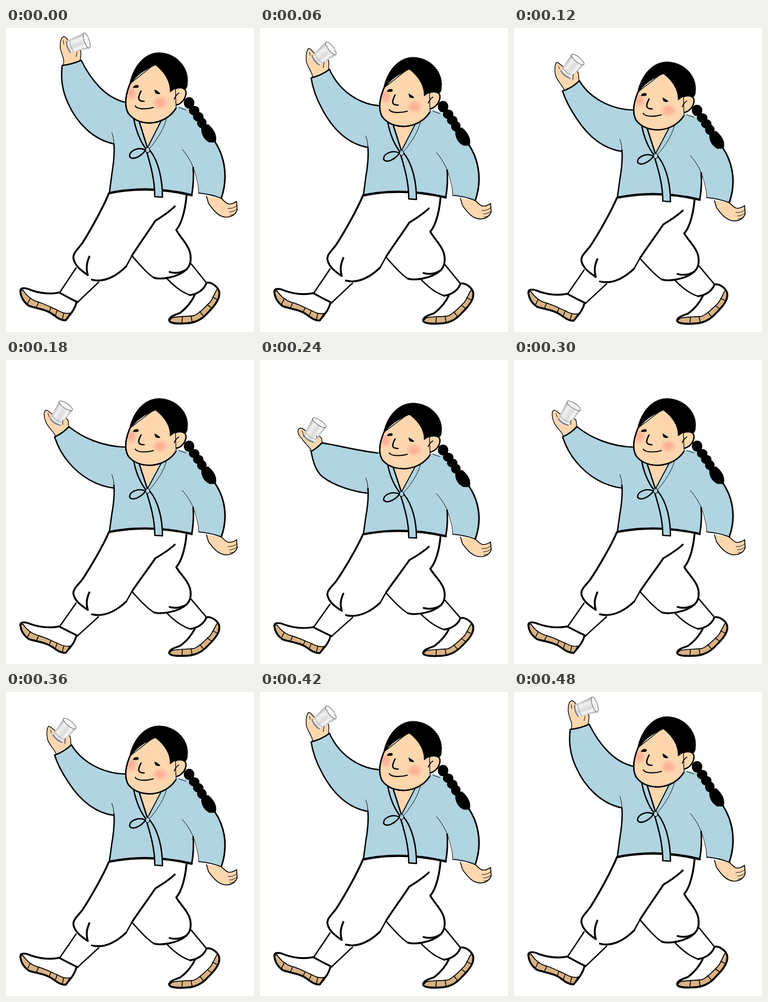
An HTML page that plays this animation: 485 px wide and 593 px high, repeating every 540 ms.

```html
<!DOCTYPE html>
<html lang="en">
<head>
<meta charset="utf-8">
<title>Raised cup</title>
<style>
html, body { margin: 0; width: 100%; height: 100%; overflow: hidden; background: #fff; }
svg { display: block; }
path, ellipse { fill: none; stroke: #000; stroke-width: 2.7; stroke-linecap: round; stroke-linejoin: round; }
.thin { stroke-width: 1; }
.bold { stroke-width: 3.7; }
.cloth { fill: #b0d4e0; }
.skin { fill: #fed7ae; }
.hair { fill: #000; }
.sole { fill: #d9b384; stroke-width: 1.8; }
.plain { stroke: none; }
</style>
</head>
<body>
<svg width="485" height="593" viewBox="0 0 485 593">
  <defs>
    <radialGradient id="blush">
      <stop offset="0" stop-color="#fdaa94"/>
      <stop offset=".5" stop-color="#fdb398" stop-opacity=".8"/>
      <stop offset="1" stop-color="#fdc6a4" stop-opacity="0"/>
    </radialGradient>
    <linearGradient id="glass" x2="0" y2="1">
      <stop offset="0" stop-color="#a8a8a8"/>
      <stop offset=".25" stop-color="#f2f2f2"/>
      <stop offset=".6" stop-color="#dcdcde"/>
      <stop offset=".82" stop-color="#fafafa"/>
      <stop offset="1" stop-color="#9a9a9a"/>
    </linearGradient>
    <path id="jaw" d="M242 110C233 133 232 153 239 166C250 181 268 186 285 185C305 183 322 173 332 157L330 100L292 70Z"/>
    <clipPath id="face"><use href="#jaw"/></clipPath>
  </defs>

  <path id="hand" class="skin" style="stroke-width:1.4"/>
  <path id="sleeve" class="cloth"/>
  <g id="cup">
    <path class="plain" style="fill:url(#glass)" d="M-20 -12L20 -16V16L-20 12Q-25 0 -20 -12Z"/>
    <path style="stroke:#858585;stroke-width:3" d="M-18 -11Q-22 0 -18 11"/>
    <path style="stroke:#b0b0b0;stroke-width:1.5" d="M-11 -12Q-15 0 -11 12"/>
    <ellipse cx="20" rx="5" ry="15.5" style="fill:#f5f5f5;stroke:#555;stroke-width:1"/>
  </g>
  <path id="fingers" class="thin"/>

  <g id="figure">
    <!-- trousers -->
    <path class="bold" d="M201 323C190 350 165 395 149 420C140 432 130 440 132 450C135 465 150 475 160 482C156 468 158 458 163 446"/>
    <path class="bold" d="M168 491C195 498 220 480 235 465"/>
    <path d="M235 465L247 443"/>
    <path class="bold" d="M247 443C265 415 280 395 292 376C305 368 318 360 330 348"/>
    <path class="bold" d="M353 327C351 350 345 380 333 394C340 408 360 425 361 445C362 460 358 465 353 471C335 488 300 491 289 487"/>
    <path d="M289 487C275 478 260 460 246 444"/>
    <path class="bold" d="M320 476Q337 481 353 471"/>
    <path d="M137 468L105 516M181 496L140 535M362 460L392 497M315 489C330 505 345 516 360 521"/>
    <path class="bold" d="M104 516Q122 526 140 535M392 497C388 510 375 519 360 521"/>

    <!-- shoes -->
    <path class="sole" d="M33 511C42 525 52 532 65 535C80 540 92 547 100 550C110 556 118 558 125 556L117 571C108 572 100 566 92 560C80 550 60 548 45 543C35 535 28 525 28 513Z"/>
    <path class="sole" d="M414 508C408 515 405 530 397 537C388 545 380 556 368 561C355 563 340 562 325 565L319 571C320 577 335 578 350 577C370 577 385 568 395 555C405 545 420 530 418 515Z"/>
    <path style="stroke-width:1.6" d="M47 528L41 540M64 535L59 546M88 545L84 555M100 551L96 562M113 556L110 569M404 525L414 530M394 540L402 546M379 553L386 562M362 562L364 574M345 563L344 576"/>
    <path class="bold" d="M104 516C85 520 65 517 48 511C40 507 28 505 28 513C29 525 35 535 45 542C60 547 80 549 92 559C100 565 108 571 117 570C124 560 135 550 138 534"/>
    <path class="bold" d="M392 497C402 495 415 505 417 515C419 530 405 545 395 555C385 567 370 576 350 576C335 577 318 576 319 569C321 562 330 560 340 556C355 545 365 530 369 521"/>

    <!-- lowered hand and jacket -->
    <path class="skin" style="stroke-width:1.7" d="M392 328L396 342C405 355 415 368 430 369C440 369 448 365 452 355L451 338C445 343 438 344 434 343C428 340 424 335 421 332"/>
    <path class="thin" d="M434 352Q444 353 452 346M437 359Q445 359 452 353M438 365Q445 365 450 360"/>
    <path class="cloth plain" d="M234 144L211 226Q213 250 207 285L202 323Q280 306 363 327L367 272C374 290 377 305 377 322Q400 324 421 332C437 285 424 245 408 221L393 190C385 172 365 158 338 153Z"/>
    <path d="M211 226Q213 250 207 285L202 323"/>
    <path class="thin" d="M207 204Q211 214 211 226M338 155L352 160M345 237C360 255 368 272 373 295Q377 308 377 322"/>
    <path style="stroke-width:1.8" d="M377 322Q400 324 421 332"/>
    <path style="stroke-width:3.1" d="M408 221C424 245 437 285 421 332M366 272Q368 300 363 327"/>
    <path style="stroke-width:4.6" d="M202 322Q280 306 363 326"/>

    <!-- collar and ribbon -->
    <path class="skin plain" d="M258 174L276 231L303 178Z"/>
    <path class="thin" d="M314 176C308 200 292 222 280 236"/>
    <path style="stroke-width:1.8" d="M303 182L277 233"/>
    <path d="M250 178C254 200 263 222 274 236M261 184L276 232"/>
    <path class="cloth" d="M275 241C282 265 291 295 291 329L306 330C306 300 300 262 281 238"/>
    <path class="cloth" d="M273 238C258 231 240 240 242 251C248 259 265 250 273 238Z"/>
    <ellipse class="cloth" cx="277" cy="238" rx="4" ry="5" style="stroke-width:1.3"/>

    <!-- braid -->
    <g transform="translate(0 -2)">
      <ellipse class="hair" cx="358" cy="148" rx="9" ry="10"/>
      <ellipse class="hair" cx="368" cy="163" rx="9" ry="8"/>
      <ellipse class="hair" cx="376" cy="175" rx="9" ry="8"/>
      <ellipse class="hair" cx="383" cy="187" rx="8" ry="9"/>
      <path class="hair" d="M384 193C381 206 387 218 398 224L409 224C412 212 405 200 395 191Z"/>
    </g>

    <!-- head -->
    <path class="skin" d="M322 127C332 112 353 114 352 127C351 141 339 152 328 150"/>
    <use href="#jaw" class="skin" style="stroke:none"/>
    <path class="skin plain" d="M242 110C233 133 232 153 239 166C250 181 268 186 285 185C305 183 322 173 332 157L330 100L292 70Z"/>
    <g clip-path="url(#face)">
      <ellipse cx="302" cy="146" rx="18" ry="15" class="plain" style="fill:url(#blush)"/>
      <ellipse cx="245" cy="126" rx="14" ry="17" class="plain" style="fill:url(#blush)"/>
    </g>
    <path d="M242 110C233 133 232 153 239 166C250 181 268 186 285 185C305 183 322 173 332 157"/>
    <path class="hair" style="stroke-width:1" d="M241 113C246 82 266 49 299 48C335 49 357 78 355 105Q355 116 351 119C340 113 332 116 321 125C322 104 309 85 292 72C272 81 254 92 241 113Z"/>
    <path d="M329 139Q332 131 338 127" style="stroke-width:1.8"/>
    <path class="hair" style="stroke-width:1.4" d="M249 116Q251 111 258 112Q260 115 257 116ZM291 121Q296 123 301 128Q297 129 293 127Z"/>
    <path d="M264 123C260 132 254 143 270 143"/>
    <path style="stroke-width:2.2" d="M253 152C256 159 275 159 288 155"/>
  </g>
</svg>
<script>
const STEP_MS = 60, STEPS = 9, GROUND = 593;
const el = id => document.getElementById(id);

// Arm poses at 0, 2 and 3 steps down; the others follow from a parabola.
const arm = {
  sleeve: [
    "M211 226C172 218 139 187 121 146C109 120 107 95 110 73Q129 71 147 63C165 99 194 137 234 145",
    "M212 241C176 236 146 213 122 176C110 158 101 142 95 123Q113 117 128 103C147 135 187 159 234 160",
    "M212 250C178 246 146 228 122 199C110 185 101 168 95 150Q111 143 123 130C150 152 190 169 234 170"],
  hand: [
    "M112 72C116 60 106 48 106 36C106 24 109 17 114 17C120 17 128 40 146 44C148 52 145 58 145 65",
    "M98 121C94 110 83 102 81 91C79 80 80 68 84 67C89 66 96 84 124 85C128 90 126 97 127 103",
    "M96 148C96 142 82 132 78 121C74 112 73 100 78 98C84 96 92 115 118 114C124 118 121 124 123 130"],
  fingers: [
    "M139 47L137 56M112 24L113 32",
    "M116 90L115 101M87 74L89 80",
    "M111 117L111 126M82 104L85 112"]
};
const cup = [
  "translate(139 31) rotate(-19)",
  "translate(112 77) rotate(-51)",
  "translate(106 106) rotate(-57)"];

function blend(poses, k) {
  const weights = [(k - 2) * (k - 3) / 6, k * (3 - k) / 2, k * (k - 2) / 3];
  const numbers = poses.map(p => p.match(/-?\d+/g));
  let i = 0;
  return poses[0].replace(/-?\d+/g, () => {
    const value = weights.reduce((sum, w, n) => sum + w * numbers[n][i], 0);
    i++;
    return value.toFixed(2);
  });
}

function draw(now) {
  const step = Math.floor(now / STEP_MS) % STEPS;
  const k = 4 - Math.abs(step - 4);
  const squash = 1 - 0.0165 * k;
  el("figure").setAttribute("transform", `translate(0 ${GROUND * (1 - squash)}) scale(1 ${squash})`);
  for (const id in arm) el(id).setAttribute("d", blend(arm[id], k));
  el("cup").setAttribute("transform", blend(cup, k));
}

const start = performance.now();
function tick() {
  draw(performance.now() - start);
  requestAnimationFrame(tick);
}
tick();
</script>
</body>
</html>
```
